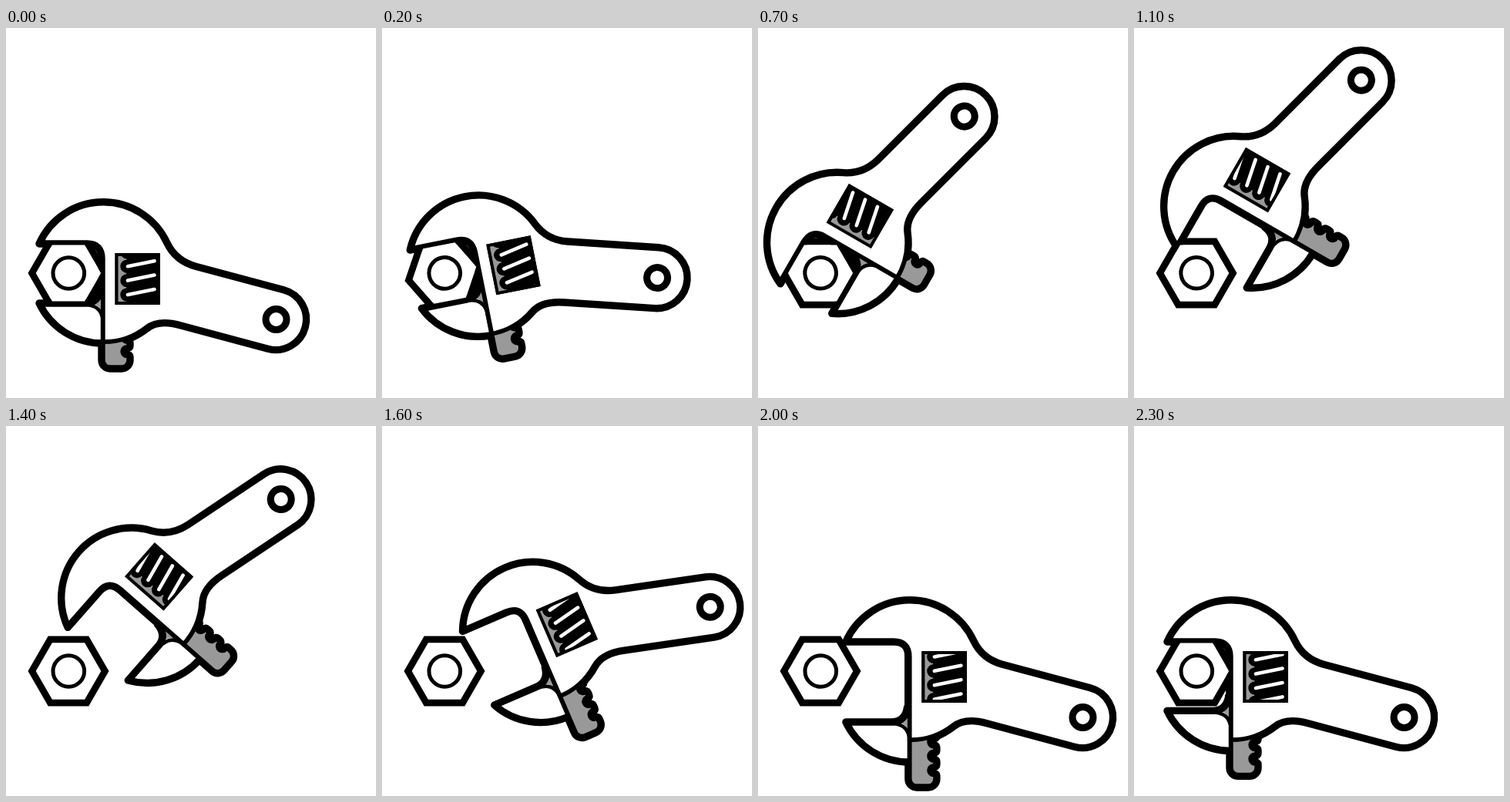
Recreate the animation shown at these times as an HTML page. Size 480 by 480 pixels, loop 2400 ms.

```html
<!DOCTYPE html>
<html lang="en">
<head>
<meta charset="utf-8">
<title>Wrench and nut</title>
<style>
  html, body { margin: 0; width: 100%; height: 100%; overflow: hidden; background: #fff; }
  svg { display: block; width: 100vw; height: 100vh; }
  .line { fill: none; stroke: #000; stroke-width: 9.4; stroke-linejoin: round; }
  .white { fill: #fff; }
  .gray { fill: #999; }
</style>
</head>
<body>
<svg viewBox="0 0 480 480">
  <defs>
    <path id="body" d="M43 280 A91 91 0 0 1 209 279 Q220 302 246 309.2 L360.2 339.8
      A39.5 39.5 0 0 1 339.8 416.2 L226 385.7 Q198 378 183 389.7 A91 91 0 0 1 124 409
      V299 Q124 280 105 280 Z"/>
    <path id="hex"/>
    <path id="rack" class="line gray"/>
    <clipPath id="inBody"><use href="#body"/></clipPath>
    <clipPath id="inWindow"><rect x="144" y="295" width="53" height="61"/></clipPath>
  </defs>

  <use id="nutEdge" href="#hex" class="line" style="stroke-linejoin:miter;stroke-width:9"/>

  <g id="wrench">
    <use href="#body" class="line white"/>
    <g id="jaw">
      <use href="#rack"/>
      <path class="gray" d="M102 357 Q123 357 124 336 H127 V375 Z"/>
      <path class="white" d="M43 357 H106 Q124 357 124 374 V409 A91 91 0 0 1 43 357 Z"/>
      <path class="line" d="M125 409 A91 91 0 0 1 43 357 H102 Q121 357 123 336"/>
      <path class="line" style="stroke-width:4.5" d="M102 359 Q122 359 125 376 V409"/>
    </g>
    <g clip-path="url(#inBody)"><use href="#body" class="line white"/></g>
    <!-- hides the antialiased seam along the clip edge -->
    <use href="#body" class="line" style="stroke-width:2"/>
    <circle class="line" cx="350.5" cy="378" r="13.5" style="stroke-width:9"/>
    <rect x="141.5" y="292" width="58.5" height="67"/>
    <g clip-path="url(#inWindow)">
      <g id="gear">
        <use href="#rack"/>
        <path id="threads" fill="none" stroke="#fff" stroke-width="4.6" stroke-linecap="round"/>
      </g>
    </g>
    <path fill="none" stroke="#000" stroke-width="4" d="M143.5 294 H198 V357 H143.5 Z"/>
  </g>

  <g id="nut">
    <use href="#hex" class="white" transform="translate(81 318) scale(.89) translate(-81 -318)"/>
    <circle class="line" cx="81.3" cy="318" r="20.3" style="stroke-width:5"/>
  </g>
</svg>
<script>
const LOOP = 2400, STEP = 100;
const NUT = { x: 81, y: 318 };
const TURN = -60, SLIDE = 80, OPEN = 27, PITCH = 18.4;
const el = id => document.getElementById(id);

function buildShapes() {
  const corners = Array.from({ length: 6 }, (_, i) => {
    const a = i * Math.PI / 3;
    return `${NUT.x + 47.3 * Math.cos(a)} ${NUT.y + 47.3 * Math.sin(a)}`;
  });
  el('hex').setAttribute('d', `M${corners.join('L')}Z`);

  // Rack teeth and worm threads share one pitch.
  let rack = 'M124 258 H161', threads = '';
  for (let y = 346 - 4 * PITCH; y < 425; y += PITCH) {
    rack += `V${y - 7} Q161 ${y - 4} 157 ${y - 4} A4 4 0 0 0 157 ${y + 4} Q161 ${y + 4} 161 ${y + 7}`;
    threads += `M158 ${y} L192.5 ${y - 7}`;
  }
  el('rack').setAttribute('d', rack + 'V431 A11 11 0 0 1 150 442 H135 A11 11 0 0 1 124 431 Z');
  el('threads').setAttribute('d', threads);
}

function ease(t, start, end) {
  const p = Math.min(1, Math.max(0, (t - start) / (end - start)));
  return (1 - Math.cos(Math.PI * p)) / 2;
}

function draw(time) {
  const t = Math.floor((time % LOOP) / STEP) * STEP;
  const turn = TURN * (ease(t, 0, 700) - ease(t, 1200, 1900));
  const slide = SLIDE * (ease(t, 940, 1200) - ease(t, 1943, 2203));
  const open = OPEN * (ease(t, 700, 940) - ease(t, 2200, 2390));
  const spin = angle => `rotate(${angle} ${NUT.x} ${NUT.y})`;

  // The nut only turns while it is gripped.
  const nutTurn = spin(t < 1200 ? turn : 0);
  el('nutEdge').setAttribute('transform', nutTurn);
  el('nut').setAttribute('transform', nutTurn);
  el('wrench').setAttribute('transform', `${spin(turn)} translate(${slide} 0)`);
  for (const id of ['jaw', 'gear']) el(id).setAttribute('transform', `translate(0 ${open})`);
}

buildShapes();
const begin = performance.now();
function tick() {
  draw(performance.now() - begin);
  requestAnimationFrame(tick);
}
tick();
</script>
</body>
</html>
```
